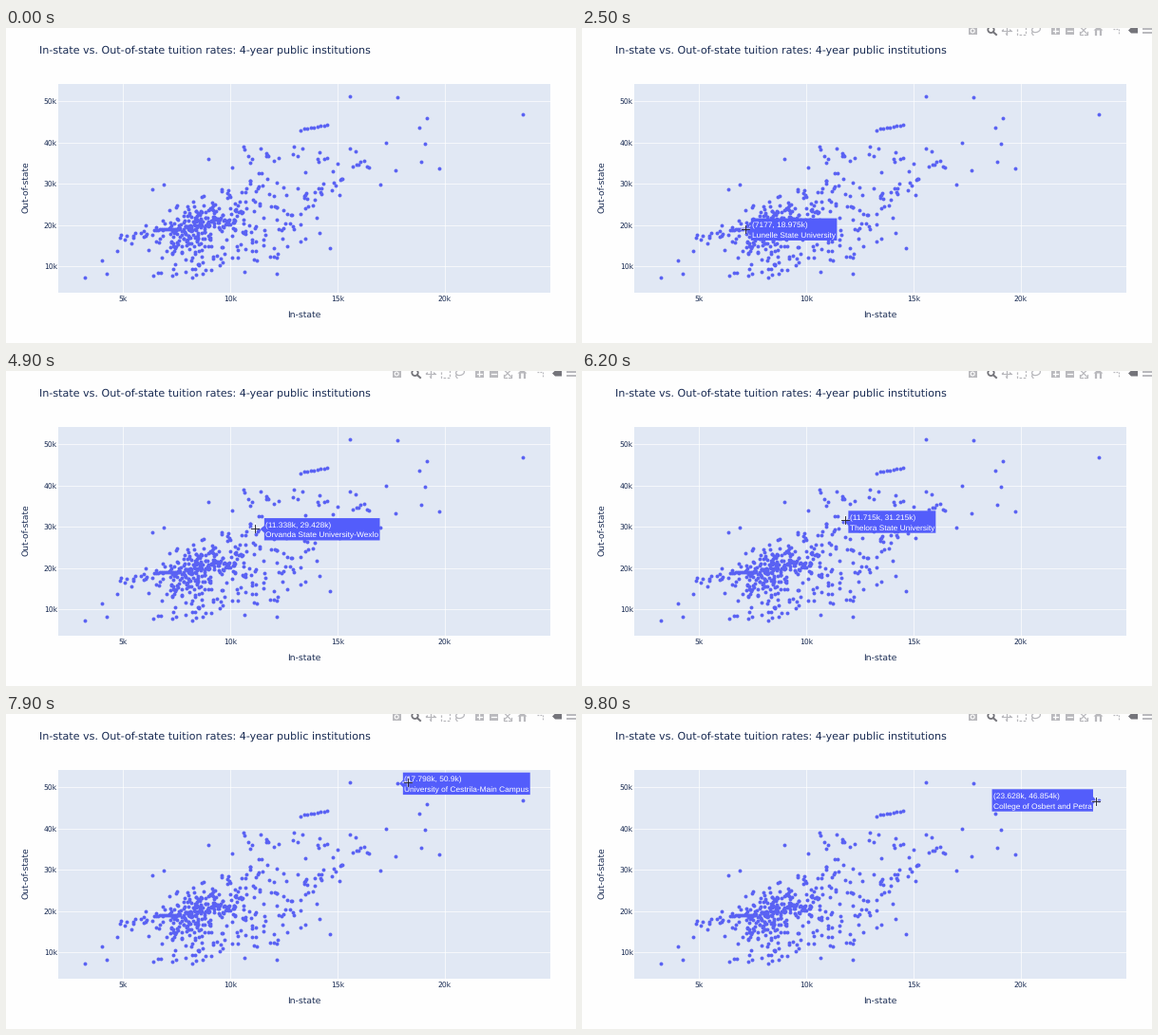
Recreate the animation shown at these times as a matplotlib script. Size 600x332 px, loop 9.9 s.

```python
import numpy as np
import matplotlib.pyplot as plt
from matplotlib.animation import FuncAnimation
from matplotlib.patches import Circle, Ellipse, Polygon, Rectangle

W, H, DPI = 600, 332, 100
FRAMES, STEP = 99, 100
PT = 72 / DPI  # points per pixel
NAVY, BLUE, PANEL = "#182a52", "#5a62f3", "#e1e8f4"
LABEL_BLUE, GREY, ACTIVE = "#535dfb", "#b9b9bd", "#74747a"
POINTER_IN, HOVER_IN = 1100, 1500

plt.rcParams["text.hinting"] = "none"
fig = plt.figure(figsize=(W / DPI, H / DPI), dpi=DPI, facecolor="#fefefe")
ax = fig.add_axes([0, 0, 1, 1])
ax.set(xlim=(0, W), ylim=(H, 0))
ax.axis("off")

# arrive ms, leave ms, in-state, out-of-state, pointer offset, name
STOPS = [
    (1600, 2300, 6886, 18765, (3, 0),
     "Valmorinda State University-San Torvelino"),
    (3600, 4000, 9226, 22050, (7, -5.5), "University of Northern Varnel"),
    (4700, 5300, 11338, 29428, (-3.7, -1), "Orvanda State University-Wexlo"),
    (6000, 6300, 11715, 31215, (2.2, -2), "Thelora State University"),
    (7600, 8200, 17798, 50900, (10.5, -1.5),
     "University of Cestrila-Main Campus"),
    (9300, 9900, 23628, 46854, (-2.4, 1.2), "College of Osbert and Petra"),
]
STEMS = ["Castova", "Brennock", "Ellory", "Lunelle", "Corrava"]


def to_x(value):
    return 122.8 + (value - 5000) * 0.0226


def to_y(value):
    return 251.3 - (value - 10000) * 0.00435


def to_values(x, y):
    return (round(5000 + (x - 122.8) / 0.0226),
            round(10000 + (251.3 - y) / 0.00435))


def write(x, y, text, size, color=NAVY, font="DejaVu Sans", **kw):
    return ax.text(x, y, text, size=size * PT, color=color, family=font, **kw)


def stroke(xs, ys, color, width=1, **kw):
    return ax.plot(xs, ys, color=color, lw=width * PT, **kw)[0]


def draw_chart():
    ax.add_patch(Rectangle((55, 59), 518, 220, fc=PANEL, ec="none"))
    for k in range(5, 21, 5):
        x = to_x(k * 1000)
        stroke([x, x], [59, 279], "white", 0.8, alpha=0.85)
        write(x, 287.5, f"{k}k", 7.7, ha="center")
    for k in range(10, 51, 10):
        y = to_y(k * 1000)
        stroke([55, 573], [y, y], "white", 0.8, alpha=0.85)
        write(54, y + 2.8, f"{k}k", 7.7, ha="right")
    write(34.9, 26.7, "In-state vs. Out-of-state tuition rates: "
          "4-year public institutions", 11.13)
    write(313.5, 304.8, "In-state", 9.3, ha="center")
    write(21, 168, "Out-of-state", 9.2, rotation=90, ha="center", va="center")


def make_dots():
    """Seeded clouds of schools, each scattered about a line."""
    rng = np.random.default_rng(5)

    def cloud(xs, start, end, spread):
        xs = np.sort(xs)
        line = start + (end - start) * (xs - xs[0]) / (xs[-1] - xs[0])
        return np.column_stack([xs, line + rng.normal(0, spread, xs.size)])

    lone = [(83, 263), (101, 245), (106, 259), (117, 235), (213, 138),
            (154, 170), (166, 164.5), (362, 72), (443, 95), (435, 104.5),
            (441, 122), (400, 121), (437, 140.5), (456, 148), (410, 149.5),
            (394, 165), (362, 127), (341, 231.5), (285, 242)]
    return np.vstack([
        [(to_x(s[2]), to_y(s[3])) for s in STOPS], lone,
        cloud(rng.normal(200, 21, 190).clip(150, 250), 222, 200, 12),
        cloud(rng.uniform(190, 270, 75), 205, 182, 15),
        cloud(rng.uniform(240, 332, 75), 214, 186, 19),
        cloud(rng.uniform(175, 265, 28), 245, 232, 7),
        cloud(rng.uniform(120, 155, 15), 222, 214, 4),
        cloud(rng.uniform(154, 222, 15), 263, 252, 4),
        cloud(rng.uniform(250, 382, 30), 132, 143, 6),
        cloud(rng.uniform(328, 368, 12), 180, 148, 5),
        cloud(np.linspace(156, 182, 14), 213, 211.5, 0.5),
        cloud(np.linspace(310, 338, 9), 107.5, 102, 0.2),
    ])


def draw_toolbar():
    items = []

    def patch(shape):
        items.append(ax.add_patch(shape))

    def fill(points, color=GREY):
        patch(Polygon(points, fc=color, ec="none"))

    def line(xs, ys, color=GREY, width=1.2, **kw):
        items.append(stroke(xs, ys, color, width, **kw))

    # camera and magnifier
    patch(Rectangle((406.5, -1), 9.5, 7.5, fc=GREY, ec="none"))
    patch(Circle((411.2, 3), 2, fc=GREY, ec="white", lw=0.8))
    patch(Circle((430.5, 1.8), 3.2, fc="none", ec=ACTIVE, lw=1.3))
    line([433, 436], [4.3, 7], ACTIVE, 2)
    # pan arrows
    line([442, 452], [2.5, 2.5])
    line([447, 447], [-2, 7])
    for dx, dy in ((1, 0), (-1, 0), (0, 1)):
        x, y = 447 + 4 * dx, 2.5 + 4 * dy
        fill([(x + 1.4 * dx, y + 1.4 * dy), (x - dx + 1.5 * dy, y - dy + 1.5 * dx),
              (x - dx - 1.5 * dy, y - dy - 1.5 * dx)])
    # box and lasso selection
    patch(Rectangle((458, -2), 9, 9, fc="none", ec=GREY, lw=0.9,
                    ls=(0, (2, 1.3))))
    patch(Ellipse((478, 1.5), 9, 6, angle=-15, fc="none", ec=GREY, lw=0.9))
    line([474.5, 473.5, 475], [3.5, 5.5, 7.5])
    # zoom in, zoom out, autoscale
    for x in (498, 513):
        patch(Rectangle((x - 4.5, -2), 9, 9, fc=GREY, ec="none"))
        line([x - 2.5, x + 2.5], [2.5, 2.5], "white", 1.3)
    line([498, 498], [0, 5], "white", 1.3)
    for ends in ((-1, 6), (6, -1)):
        line([524.5, 531.5], ends)
    for x, d in ((524, 3), (532, -3)):
        line([x, x, x + d], [4, 6.7, 6.7])
    # home, spike lines, hover tag, compare
    fill([(538.5, 2.5), (543.5, -2), (548.5, 2.5)])
    for x in (541.2, 545.8):
        line([x, x], [2.5, 6.5], width=2.2)
    line([559, 565, 565], [1, 1, 6], ls=(0, (1.5, 1)))
    fill([(575, 2.5), (578, -0.5), (585, -0.5), (585, 5.5), (578, 5.5)],
         ACTIVE)
    for y in (0.5, 4.5):
        line([591, 600], [y, y], GREY, 2)
    return items


def rest_point(stop):
    return np.array([to_x(stop[2]), to_y(stop[3])]) + stop[4]


def pointer_at(ms):
    """Ease from stop to stop, entering just below the first one."""
    where = rest_point(STOPS[0]) + (-1, 7)
    left = POINTER_IN
    for stop in STOPS:
        goal = rest_point(stop)
        t = np.clip((ms - left) / (stop[0] - left), 0, 1)
        where = where + (goal - where) * t * t * (3 - 2 * t)
        left = stop[1]
    return where


def hovered(ms, pointer):
    """Position, values and name of the school under the pointer."""
    if ms < HOVER_IN:
        return None
    for arrive, leave, inside, outside, _, name in STOPS:
        if arrive - 100 <= ms <= leave:
            return to_x(inside), to_y(outside), inside, outside, name
    gaps = np.hypot(*(dots - pointer).T)
    i = int(gaps.argmin())
    if gaps[i] > 12:
        return None
    name = f"{STEMS[i % len(STEMS)]} State University"
    return (*dots[i], *to_values(*dots[i]), name)


def amount(value):
    return str(value) if value < 10000 else f"{value / 1000:g}k"


draw_chart()
dots = make_dots()
ax.scatter(*dots.T, s=(3.9 * PT) ** 2, c=BLUE, lw=0, zorder=3)
toolbar = draw_toolbar()
box = ax.add_patch(Polygon([(0, 0), (1, 0), (1, 1)], fc=LABEL_BLUE,
                           ec="none", zorder=5))
coords, school = (write(0, 0, "", 8.33, "white", "Liberation Sans", zorder=6)
                  for _ in range(2))
halo = [stroke([], [], "white", 2.2, alpha=0.45, zorder=7) for _ in range(2)]
cross = [stroke([], [], "#22222c", 0.9, zorder=8) for _ in range(2)]


def show_hover(target):
    for item in (box, coords, school):
        item.set_visible(target is not None)
    if target is None:
        return
    px, py, inside, outside, name = target
    coords.set_text(f"({amount(inside)}, {amount(outside)})")
    school.set_text(name)
    width = max(t.get_window_extent().width for t in (coords, school)) + 2.6
    side = 1 if px + width < 573 else -1
    near, far = px + side * 5.8, px + side * (5.8 + width)
    box.set_xy([(px + side * 2, py), (near, py - 3.8), (near, py - 11.7),
                (far, py - 11.7), (far, py + 11.7), (near, py + 11.7),
                (near, py + 3.8)])
    left = min(near, far) + 1.4
    coords.set_position((left, py - 1.6))
    school.set_position((left, py + 9))


def update(frame):
    ms = frame * STEP
    for item in toolbar:
        item.set_alpha(float(np.clip((ms - 1300) / 300, 0, 1)))
    x, y = pointer = pointer_at(ms)
    show_hover(hovered(ms, pointer))
    for bars, reach in ((halo, 4.4), (cross, 4)):
        bars[0].set_data([x - reach, x + reach], [y, y])
        bars[1].set_data([x, x], [y - reach, y + reach])
        for bar in bars:
            bar.set_visible(ms >= POINTER_IN)
    return [*toolbar, box, coords, school, *halo, *cross]


anim = FuncAnimation(fig, update, frames=FRAMES, interval=STEP,
                     init_func=lambda: update(0), repeat=True, repeat_delay=0)
plt.show()
```
